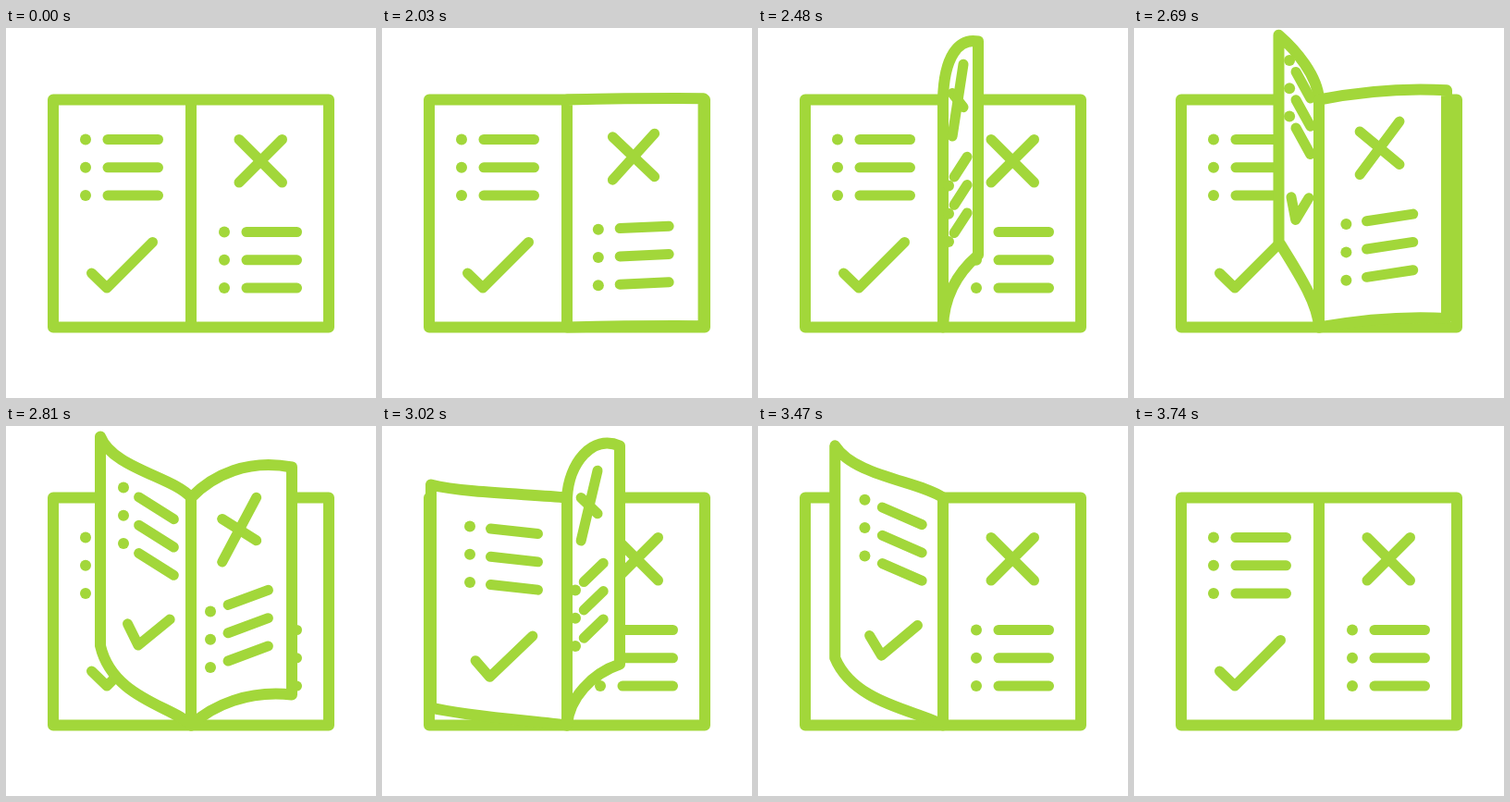
An HTML page with a canvas that plays this animation: 400x400 px, repeating every 3.77 s.

```html
<!DOCTYPE html>
<html lang="en">
<head>
<meta charset="utf-8">
<title>Turning pages</title>
<style>
html, body { margin: 0; width: 100%; height: 100%; overflow: hidden; background: #fff; }
canvas { display: block; width: 400px; height: 400px; }
</style>
</head>
<body>
<canvas id="stage" width="400" height="400"></canvas>
<script>
const ctx = document.getElementById('stage').getContext('2d');
const GREEN = '#a2d73a';
const LOOP = 3770, REST = 2030, STEP = 30, TURN = 1140, GAP = 600;
const SPINE = 200, TOP = 77.5, BOTTOM = 323.5;
const NEAR = 36, FAR = 114; // distances of the marks from the spine

// time, then: near x, far x, near lift, far lift | edge x, top lift, bottom lift |
// curve handles: x1, x2, top lifts 1 and 2, bottom lifts 1 and 2
const KEYS = [
  [0,     36,  114,   0,  0,   149,  0,  0,   50,  100,  0,  0,  0,  0],
  [210,   21,   83,  20, 43,   109, 33, 33,   24,   62, 25, 42, 22, 38],
  [420,    9,   39,  43, 72,    57, 56, 66,    2,   27, 37, 69, 29, 56],
  [480,    6,   26,  50, 81,    38, 63, 78,    1,   17, 47, 67, 34, 60],
  [570,    0,    1,  54, 91,     4, 68, 88,    0,    1, 42, 60, 32, 64],
  [660,   -7,  -22,  49, 89,   -30, 70, 93,    0,  -14, 27, 57, 29, 66],
  [810,  -19,  -73,  20, 54,   -98, 66, 86,  -18,  -85, 22, 32, 20, 29],
  [1020, -32, -105,   4, 12,  -147, 14, 19,  -40, -110,  4,  5,  5, 10],
  [1140, -36, -114,   0,  0,  -149,  0,  0,  -50, -100,  0,  0,  0,  0]
];

function slope(i, c) {
  const a = KEYS[i], b = KEYS[i + 1];
  return (b[c] - a[c]) / (b[0] - a[0]);
}

// Monotone tangent; the page outline eases at both ends, the marks do not.
function tangent(i, c) {
  const last = KEYS.length - 1;
  if (i === 0 || i === last) return c > 4 ? 0 : slope(i ? i - 1 : 0, c);
  const a = slope(i - 1, c), b = slope(i, c);
  return a * b > 0 ? 2 * a * b / (a + b) : 0;
}

function poseAt(t) {
  let i = 0;
  while (i < KEYS.length - 2 && t >= KEYS[i + 1][0]) i++;
  const a = KEYS[i], b = KEYS[i + 1], h = b[0] - a[0];
  const s = (t - a[0]) / h, r = 1 - s;
  return a.slice(1).map((_, k) => {
    const c = k + 1;
    return a[c] * (1 + 2 * s) * r * r + b[c] * s * s * (3 - 2 * s)
      + h * s * r * (tangent(i, c) * r - tangent(i + 1, c) * s);
  });
}

function line(points) {
  ctx.lineWidth = 11;
  ctx.beginPath();
  points.forEach(p => ctx.lineTo(p[0], p[1]));
  ctx.stroke();
}

function drawMarks(right, [nearX, farX, nearLift, farLift]) {
  const place = (d, y, lo = NEAR, hi = FAR) => [
    SPINE + nearX + (farX - nearX) * (d - NEAR) / (FAR - NEAR),
    y - nearLift - (farLift - nearLift) * (d - lo) / (hi - lo)
  ];
  for (let i = 0; i < 3; i++) {
    const y = (right ? 220.5 : 120.5) + i * 30.3;
    const [x, dotY] = place(right ? NEAR : FAR, y);
    ctx.beginPath();
    ctx.arc(x, dotY, 6, 0, 7);
    ctx.fill();
    line(right ? [place(60, y), place(114.5, y)] : [place(90, y), place(35.5, y)]);
  }
  if (right) {
    const cross = (d, y) => place(d, y, 52, 98);
    line([cross(52, 120.5), cross(98.5, 167)]);
    line([cross(98.5, 120.5), cross(52, 167)]);
  } else {
    line([place(107.5, 265), place(91, 281), place(41.5, 231.5)]);
  }
}

function drawPage(t) {
  const pose = poseAt(t);
  const [edge, top, bottom, x1, x2, t1, t2, b1, b2] = pose.slice(4);
  const X = SPINE;
  ctx.beginPath();
  ctx.moveTo(X, TOP);
  ctx.bezierCurveTo(X + x1, TOP - t1, X + x2, TOP - t2, X + edge, TOP - top);
  ctx.lineTo(X + edge, BOTTOM - bottom);
  ctx.bezierCurveTo(X + x2, BOTTOM - b2, X + x1, BOTTOM - b1, X, BOTTOM);
  ctx.closePath();
  ctx.fillStyle = '#fff';
  ctx.fill();
  ctx.fillStyle = GREEN;
  ctx.lineWidth = 12;
  ctx.stroke();
  drawMarks(t <= 570, pose);
}

function drawBook() {
  ctx.lineWidth = 12;
  ctx.beginPath();
  ctx.rect(51, TOP, 298, BOTTOM - TOP);
  ctx.moveTo(SPINE, TOP);
  ctx.lineTo(SPINE, BOTTOM);
  ctx.stroke();
  drawMarks(false, [-NEAR, -FAR, 0, 0]);
  drawMarks(true, [NEAR, FAR, 0, 0]);
}

function draw(now) {
  const time = now % LOOP;
  const t = time < REST ? 0 : (Math.floor((time - REST) / STEP) + 1) * STEP;
  ctx.fillStyle = '#fff';
  ctx.fillRect(0, 0, 400, 400);
  ctx.fillStyle = ctx.strokeStyle = GREEN;
  ctx.lineCap = ctx.lineJoin = 'round';
  drawBook();
  for (const start of [0, GAP]) {
    const age = t - start;
    if (age > 0 && age < TURN) drawPage(age);
  }
}

const begin = performance.now();
function tick() {
  draw(performance.now() - begin);
  requestAnimationFrame(tick);
}
tick();
</script>
</body>
</html>
```
